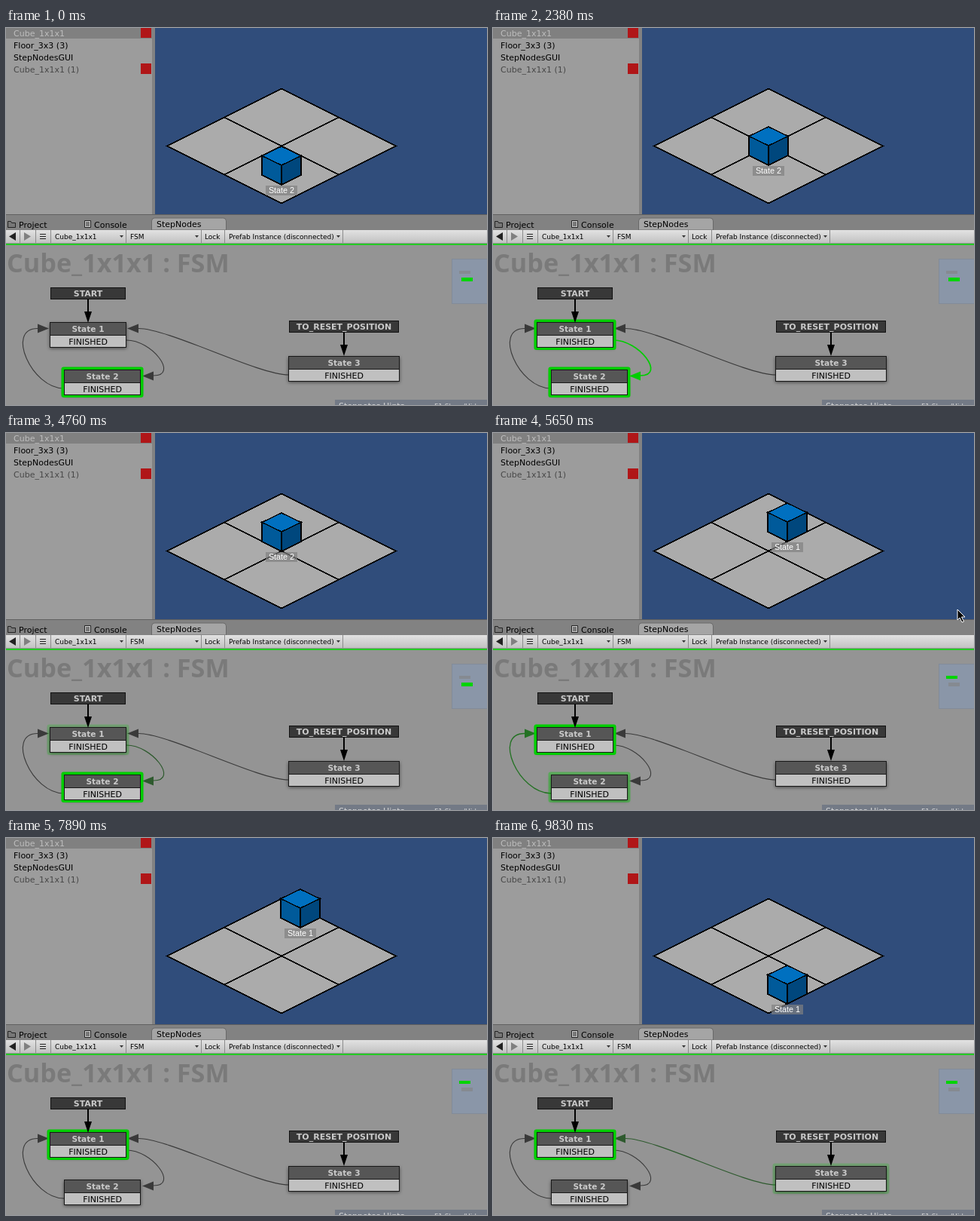
An HTML page for the animation above (9.93 s loop, 639 by 500 pixels).

```html
<!DOCTYPE html>
<html>
<head>
<meta charset="utf-8">
<style>
  html, body { margin: 0; width: 100%; height: 100%; overflow: hidden; background: #949494; }
  svg { display: block; width: 639px; height: 500px; font: 11px "DejaVu Sans", sans-serif; }
  .bold { font-weight: bold; }
  .small { font-size: 9px; }
  .mid { text-anchor: middle; }
  .crisp { shape-rendering: crispEdges; }
  .tag { font: 10.8px "Liberation Sans", sans-serif; }
  .title { font: bold 34.2px "Noto Sans", sans-serif; }
  .soft { filter: drop-shadow(0 2px 2px rgba(0, 0, 0, .55)); }
</style>
</head>
<body>
<svg viewBox="0 0 639 500">
  <defs>
    <linearGradient id="bar" x2="0" y2="1"><stop stop-color="#e2e2e2"/><stop offset="1" stop-color="#c2c2c2"/></linearGradient>
    <clipPath id="view"><rect x="198" width="441" height="247"/></clipPath>
  </defs>
  <g id="chrome"></g>
  <g id="scene" clip-path="url(#view)"></g>
  <g id="graph"></g>
  <path id="cursor" d="M617 234v14l3-3 3 6 2.500-1-3-6h4.500z" stroke="#fff"/>
</svg>
<script>
const $ = id => document.getElementById(id);

function add(parent, tag, attrs, content) {
  const el = document.createElementNS('http://www.w3.org/2000/svg', tag);
  for (const name in attrs) el.setAttribute(name, attrs[name]);
  if (content) el.textContent = content;
  return parent.appendChild(el);
}
const rect = (parent, x, y, width, height, fill, more) =>
  add(parent, 'rect', { x, y, width, height, fill, ...more });
const path = (parent, d, fill, more) => add(parent, 'path', { d, fill, ...more });
const text = (parent, x, y, content, fill = '#000', cls = '') =>
  add(parent, 'text', { x, y, fill, class: cls }, content);

// Hierarchy panel, tabs and toolbar
const chrome = $('chrome'), scene = $('scene'), graph = $('graph');
rect(chrome, 0, 0, 639, 268, '#828282');
rect(chrome, 0, 0, 194, 247, '#9c9c9c');
rect(chrome, 0, 0, 194, 14, '#808080');
rect(chrome, 0, 247, 639, 1, '#606060');
['Cube_1x1x1', 'Floor_3x3 (3)', 'StepNodesGUI', 'Cube_1x1x1 (1)'].forEach((name, i) =>
  text(chrome, 10, 11 + 16 * i, name, i % 3 ? '#000' : i ? '#484848' : '#bdbdbd'));
rect(chrome, 179, 0, 14, 13, '#b01618');
rect(chrome, 179, 47, 14, 14, '#b01618');

path(chrome, 'M193.500 268v-12q0-4 4-4h91q4 0 4 4v12z', '#a5a5a5', { stroke: '#686868' });
path(chrome, 'M2.500 264.500v-8h4l1 2h5v6z', '#777', { stroke: '#222' });
path(chrome, 'M104.500 255.500h8v9h-8zM106 258h5M106 260h5M106 262h5', '#ccc', { stroke: '#222' });
text(chrome, 17, 265, 'Project');
text(chrome, 117, 265, 'Console');
text(chrome, 200, 264, 'StepNodes');

rect(chrome, 0, 268, 639, 17, 'url(#bar)');
for (const x of [18, 39, 59, 159, 259, 290, 447]) rect(chrome, x, 268, 1, 17, '#8c8c8c');
path(chrome, 'M13 271v11l-9-5.500z', '#222');
path(chrome, 'M24 271v11l9-5.500z', '#808080');
path(chrome, 'M45 273.500h8M45 276.500h8M45 279.500h8', 'none', { stroke: '#222' });
for (const x of [151, 251, 439]) path(chrome, `M${x} 275h5l-2.500 3z`, '#333');
[[65, 'Cube_1x1x1'], [165, 'FSM'], [264, 'Lock'], [296, 'Prefab Instance (disconnected)']]
  .forEach(([x, s]) => text(chrome, x, 280, s, '#000', 'small'));
rect(chrome, 0, 285, 639, 215, '#949494');
rect(chrome, 0, 286, 639, 2, '#24cb24');
text(chrome, 1, 324, 'Cube_1x1x1 : FSM', '#7a7a7a', 'title');

// Scene view
const outline = { stroke: '#000', 'stroke-width': 1.5, class: 'crisp' };
rect(scene, 198, 0, 441, 247, '#304d7b');
path(scene, 'M366 80.500l152 76-152 76-152-76zM290 118.500l152 76M442 118.500l-152 76', '#ababab', outline);
const cube = add(scene, 'g');
path(cube, 'M0 0l26 12.500-26 12.500-26-12.500z', '#0070c0', outline);
path(cube, 'M-26 12.500l26 12.500v26l-26-13z', '#005a9a', outline);
path(cube, 'M26 12.500l-26 12.500v26l26-13z', '#00477d', outline);
rect(cube, -21, 52, 42, 13, '#808080', { opacity: .7 });
const tag = text(cube, 0, 62, '', '#fff', 'tag mid');

// State graph
const GREEN = [0, 205, 0], DARK = [58, 58, 58];

function makeLink(curve, head) {
  const g = add(graph, 'g');
  const line = path(g, curve, 'none');
  const tip = path(g, head, '');
  return level => {
    const color = `rgb(${DARK.map((c, i) => Math.round(c + (GREEN[i] - c) * level))})`;
    line.setAttribute('stroke', color);
    line.setAttribute('stroke-width', 1.1 + .6 * level);
    tip.setAttribute('fill', color);
  };
}

function makeState(x, y, w, name) {
  const mid = x + w / 2;
  rect(graph, x, y, w, 33, '#333', { class: 'soft' });
  const glow = rect(graph, x - 3.500, y - 3.500, w + 7, 40.500, '#00cd00', { rx: 3 });
  rect(graph, x + .5, y + .5, w - 1, 33, '#c0c0c0', { stroke: '#181818' });
  rect(graph, x + 1, y + 1, w - 2, 16, '#565656');
  rect(graph, x, y + 17, w, 1, '#181818');
  text(graph, mid, y + 12.500, name, '#cacaca', 'bold mid').style.fontSize = '10.6px';
  text(graph, mid, y + 30, 'FINISHED', '#000', 'mid');
  return level => glow.setAttribute('opacity', level);
}

function makeEvent(x, y, w, name) {
  const mid = x + w / 2;
  rect(graph, x + .5, y + .5, w - 1, 15, '#383838', { stroke: '#111' });
  text(graph, mid, y + 12, name, '#cacaca', 'bold mid');
  path(graph, `M${mid - 1} ${y + 16}h2v16h4l-5 15-5-15h4z`, '#000');
}

const links = {
  '1-2': makeLink('M160 414C194 414 230 461 196 461', 'M181 461.500l15-6v12z'),
  '2-1': makeLink('M77 478C34 478 -1 398.500 42 398.500', 'M57 398.500l-15-6v12z'),
  '3-1': makeLink('M375 460C335 460 216 398.500 176 398.500', 'M161 398.500l15-6v12z'),
};
const states = {
  1: makeState(58, 390, 102, 'State 1'),
  2: makeState(77, 453, 102, 'State 2'),
  3: makeState(375, 435, 148, 'State 3'),
};
makeEvent(59, 344, 100, 'START');
makeEvent(376, 388, 146, 'TO_RESET_POSITION');

// Minimap and hint bar
rect(graph, 592.500, 306.500, 50, 59, '#8a96a8', { stroke: '#828b99' });
const marks = { 1: rect(graph, 602, 322, 15, 4), 2: rect(graph, 605, 331, 15, 5) };
rect(graph, 437, 493, 202, 7, '#737a86');
text(graph, 442, 505, 'Stepnotes Hints', '#d8d8d8');
text(graph, 569, 505, 'F1 Show/Hide', '#d8d8d8', 'small');

// Each entry: start time, fade duration, active state, cube step, things fading out
const LOOP = 9930;
const timeline = [
  [0, 1, 2, 2, ''],
  [1500, 440, 1, 3, '2 2-1'],
  [2380, 450, 2, 4, '1 1-2'],
  [3420, 440, 1, 5, '2 2-1'],
  [4460, 450, 2, 6, '1 1-2'],
  [5360, 590, 1, 7, '2 2-1'],
  [6400, 590, 2, 8, '1 1-2'],
  [7440, 450, 1, 9, '2 2-1'],
  [8490, 440, 3, 0, '1 1-2 2'],
  [9530, 450, 1, 1, '3 3-1'],
];

function draw(t) {
  const [start, fade, active, step, fading] = timeline.filter(e => e[0] <= t).pop();
  const count = Math.max(1, Math.round(fade / 147));
  const left = Math.max(0, 1 - Math.floor((t - start + 6) / fade * count) / count);
  const level = left ** 1.4;
  const old = fading.split(' ');
  const glow = id => id == active ? 1 : old.includes(id) ? level : 0;

  for (const id in states) states[id](glow(id));
  for (const id in links) links[id](glow(id));
  for (const id in marks) marks[id].setAttribute('fill', id == active ? '#00d400' : '#858a91');
  cube.setAttribute('transform', `translate(${366 + step % 2 * 25} ${Math.round(182 - 12.7 * step)})`);
  tag.textContent = 'State ' + active;
  $('cursor').setAttribute('visibility', t >= 5645 && t < 5800 ? 'visible' : 'hidden');
}

const origin = performance.now();
function tick() {
  draw((performance.now() - origin) % LOOP);
  requestAnimationFrame(tick);
}
tick();
</script>
</body>
</html>
```
